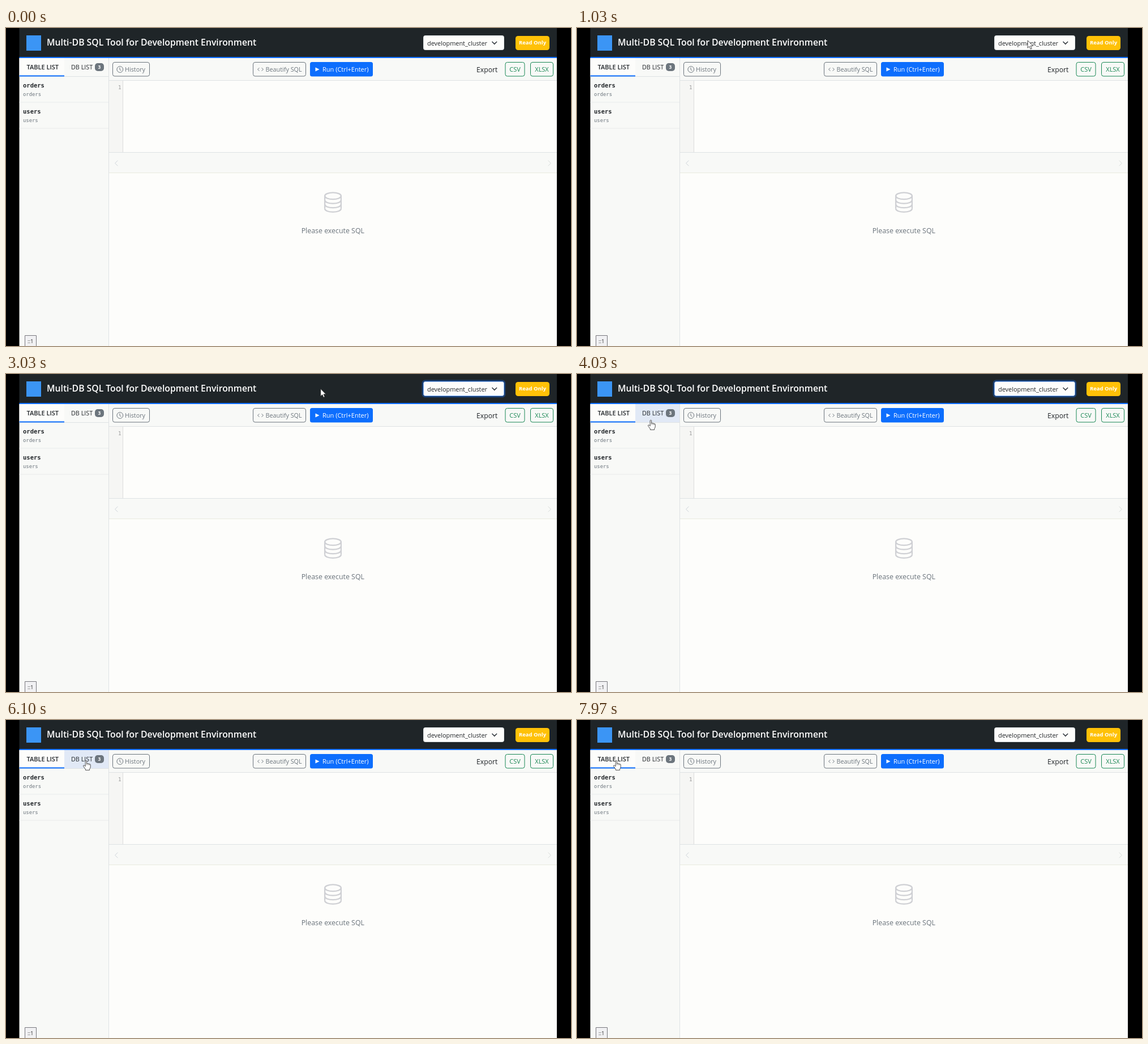
These frames come from a looping animation (998x561 px, 8 s). An HTML page with a canvas:

```html
<!DOCTYPE html>
<html lang="en">
<head>
<meta charset="utf-8">
<title>Multi-DB SQL Tool</title>
<style>
  html, body { margin: 0; width: 100%; height: 100%; overflow: hidden; background: #000; }
  canvas { display: block; width: 100%; height: 100%; }
</style>
</head>
<body>
<canvas id="stage" width="998" height="561"></canvas>
<script>
const ctx = document.getElementById('stage').getContext('2d');
const LOOP = 8000;
const SANS = '"Open Sans", "Noto Sans", sans-serif';
const MONO = '"DejaVu Sans Mono", monospace';
const INK = '#212529', GRAY = '#6c757d', BLUE = '#0d6efd', GREEN = '#198754';
const BAR = '#1f2528', PAPER = '#fdfdfb', PANEL = '#f8f9f7', LINE = '#dee2e4';

const FOCUS_AT = 1300, BLUR_AT = 5170;
const DB_TAB_AT = 6250, TABLE_TAB_AT = 7720;

// Pointer stops: time, x, y, easing of the way there
const stops = [
  [100, 690, 561, 'both'],
  [870, 796, 22, 'both'],
  [2630, 796, 22, 'both'],
  [3030, 557, 26, 'in'],
  [3730, 130, 81, 'out'],
  [4300, 130, 81, 'both'],
  [5000, 136, 69, 'both'],
  [5170, 136, 69, 'both'],
  [5900, 141, 71, 'both'],
  [6900, 141, 71, 'both'],
  [7200, 98, 71, 'in'],
  [7600, 69, 71, 'out']
];

const ease = {
  in: p => p * p,
  out: p => 1 - (1 - p) * (1 - p),
  both: p => p * p * (3 - 2 * p)
};

function pointerAt(t) {
  if (t < stops[0][0]) return null;
  for (let i = 1; i < stops.length; i++) {
    const [t0, x0, y0] = stops[i - 1];
    const [t1, x1, y1, mode] = stops[i];
    if (t < t1) {
      const p = ease[mode]((t - t0) / (t1 - t0));
      return { x: x0 + (x1 - x0) * p, y: y0 + (y1 - y0) * p };
    }
  }
  const [, x, y] = stops[stops.length - 1];
  return { x, y };
}

function rect(x, y, w, h, color) {
  ctx.fillStyle = color;
  ctx.fillRect(x, y, w, h);
}

function box(x, y, w, h, r, fill, stroke, width = 1) {
  ctx.beginPath();
  ctx.roundRect(x, y, w, h, r);
  if (fill) { ctx.fillStyle = fill; ctx.fill(); }
  if (stroke) { ctx.strokeStyle = stroke; ctx.lineWidth = width; ctx.stroke(); }
}

function text(str, x, y, size, color, weight = 400, family = SANS, align = 'left') {
  ctx.font = `${weight} ${size}px ${family}`;
  ctx.textAlign = align;
  ctx.fillStyle = color;
  ctx.fillText(str, x, y);
}

function line(points, color, width = 1) {
  ctx.beginPath();
  points.forEach(([x, y]) => ctx.lineTo(x, y));
  ctx.strokeStyle = color;
  ctx.lineWidth = width;
  ctx.stroke();
}

// Horizontal chevron; dir -1 points left, 1 points right
function chevron(x, y, w, h, dir, color, width) {
  line([[x - dir * w, y - h], [x + dir * w, y], [x - dir * w, y + h]], color, width);
}

function triangle(x1, y1, x2, y2, x3, y3, color) {
  ctx.beginPath();
  ctx.moveTo(x1, y1);
  ctx.lineTo(x2, y2);
  ctx.lineTo(x3, y3);
  ctx.fillStyle = color;
  ctx.fill();
}

function header(focused) {
  rect(23, 0, 950, 51, BAR);
  rect(23, 51, 950, 2, BLUE);
  box(36, 13, 26, 27, 0, '#3b95f5');
  text('Multi-DB SQL Tool for Development Environment', 72, 30.5, 15.75, '#fff', 600);
  if (focused) box(735.8, 11.8, 145.4, 28.4, 4.5, null, 'rgba(13,110,253,.35)', 2.4);
  box(737.5, 13.5, 142, 25, 3, PAPER, focused ? '#86b7fe' : LINE);
  text('development_cluster', 744, 30.5, 10.9, INK);
  line([[858.5, 24], [862.8, 28.3], [867.1, 24]], '#343a40', 1.6);
  box(900, 14, 60, 25, 4.5, '#ffc107');
  text('Read Only', 930, 29, 9.5, '#fff', 700, SANS, 'center');
}

function tab(label, x, w, textX, active, hover) {
  rect(x, 53, w, 32, active ? PAPER : hover ? '#e1e9f6' : PANEL);
  text(label, textX, 73, active ? 11 : 10.8, INK, active ? 600 : 400);
  if (active) rect(x, 83.5, w, 2, BLUE);
}

function tableList() {
  ['orders', 'users'].forEach((name, i) => {
    const y = 46 * i;
    text(name, 30, 104.5 + y, 10.5, INK, 700, MONO);
    text(name, 30, 120 + y, 8.9, GRAY, 400, MONO);
    rect(23, 130.5 + y, 158, 1, '#e9ecec');
  });
}

function dbList() {
  rect(24, 86, 144, 467, PAPER);
  rect(168, 86, 13, 467, '#f6f7f6');
  rect(23, 553, 158, 1, LINE);
  rect(31, 90, 126, 48.5, '#cbcbcb');
  for (let i = 0; i < 3; i++) text('shard' + (i + 1), 32, 102 + 16.4 * i, 10.6, INK);
  triangle(169.5, 96.5, 173.5, 90.5, 177.5, 96.5, '#808080');
  triangle(169.5, 545, 173.5, 551, 177.5, 545, '#808080');
}

function sidebar(dbActive, hover) {
  rect(23, 53, 158, 508, PANEL);
  (dbActive ? dbList : tableList)();
  rect(23, 85, 158, 1, LINE);
  tab('TABLE LIST', 23, 80, 36.5, !dbActive, hover === 'table');
  tab('DB LIST', 103, 78, 115, dbActive, hover === 'db');
  const shift = dbActive ? 1 : 0;
  box(157 + shift, 62, 16, 14, 5, GRAY);
  text('3', 165 + shift, 72.2, 8.4, '#fff', 700, SANS, 'center');
  rect(181, 53, 1, 508, LINE);
  box(33.5, 542.5, 20, 22, 0, '#f1f1f3', '#77777d');
  text('::1', 38, 555.5, 9.6, '#333');
}

function outlineButton(x, w, color) {
  box(x + .5, 60.5, w - 1, 24.5, 3.5, null, color);
}

function toolbar() {
  rect(182, 53, 791, 39, PANEL);
  rect(182, 92, 791, 1, LINE);

  outlineButton(188, 66, GRAY);
  ctx.beginPath();
  ctx.arc(201.3, 73, 5.4, 0, 7);
  ctx.strokeStyle = GRAY;
  ctx.lineWidth = 1;
  ctx.stroke();
  line([[201, 69.5], [201, 73.5], [203.5, 75]], GRAY);
  text('History', 210, 77, 10.8, GRAY);

  outlineButton(436, 94, GRAY);
  chevron(446, 73, 1.4, 2.8, -1, GRAY, 1);
  chevron(453, 73, 1.4, 2.8, 1, GRAY, 1);
  text('Beautify SQL', 458.5, 77, 10.8, GRAY);

  box(537, 60, 111, 25.5, 3.5, BLUE);
  triangle(546.5, 69.5, 553.5, 73, 546.5, 76.5, '#fff');
  text('Run (Ctrl+Enter)', 559, 77, 11, '#fff');

  text('Export', 831, 78, 12.2, INK);
  outlineButton(881.5, 35, GREEN);
  text('CSV', 899, 77, 11, GREEN, 400, SANS, 'center');
  outlineButton(926, 41, GREEN);
  text('XLSX', 946.5, 77, 11, GREEN, 400, SANS, 'center');
}

function editor() {
  rect(182, 93, 791, 126, PAPER);
  rect(182, 93, 24, 126, '#f6f6f4');
  rect(206, 93, 1, 126, '#ddd');
  text('1', 203.5, 108, 9.2, '#999', 400, MONO, 'right');
  rect(182, 219, 791, 1, LINE);
}

function results() {
  rect(182, 220, 791, 35, PANEL);
  rect(182, 255, 791, 1, '#e8ebdf');
  chevron(195, 238.5, 2.4, 4.8, -1, '#ced4da', 1);
  chevron(960, 238.5, 2.4, 4.8, 1, '#d9dedb', 1);
  rect(182, 256, 791, 305, PAPER);

  // Database cylinder
  const cx = 577.5, top = 296.3, rx = 14.4, ry = 5.9, step = 7.5;
  ctx.strokeStyle = '#cfd0d4';
  ctx.lineWidth = 2.3;
  ctx.beginPath();
  ctx.ellipse(cx, top, rx, ry, 0, 0, Math.PI * 2);
  ctx.stroke();
  for (let i = 1; i <= 3; i++) {
    ctx.beginPath();
    ctx.ellipse(cx, top + step * i, rx, ry, 0, 0, Math.PI);
    ctx.stroke();
  }
  for (const side of [-rx, rx]) {
    line([[cx + side, top], [cx + side, top + step * 3]], '#cfd0d4', 2.3);
  }
  text('Please execute SQL', 577.3, 362, 12.4, GRAY, 400, SANS, 'center');
}

const arrowShape = new Path2D('M0 0V13.2L3 10.4L5.1 15.2L7.3 14.2L5.2 9.6H9.4Z');
const handShape = new Path2D(
  'M-.8 1Q.4-.6 1.6 1V6Q3 4.9 4 6.3Q5.3 5.4 6.2 6.8Q7.8 6.2 8.2 8V12' +
  'Q8 14 6.6 15.5V17.4H-.6V15.8L-4.4 10.6Q-4.8 8.6-2.8 9L-.8 10.8Z');
const fingers = new Path2D('M1.6 6V8.6M4 6.3V8.8M6.2 6.8V9');

function cursor({ x, y }, hand) {
  ctx.save();
  ctx.translate(x, y);
  ctx.lineJoin = 'round';
  ctx.lineWidth = .8;
  ctx.strokeStyle = '#222';
  ctx.fillStyle = '#fff';
  const shape = hand ? handShape : arrowShape;
  ctx.fill(shape);
  ctx.stroke(shape);
  if (hand) {
    ctx.lineWidth = .5;
    ctx.stroke(fingers);
  }
  ctx.restore();
}

function hoveredTab(p) {
  if (!p || p.y < 53 || p.y > 85 || p.x < 23 || p.x > 181) return null;
  return p.x < 103 ? 'table' : 'db';
}

function draw(t) {
  const pointer = pointerAt(t);
  const hover = hoveredTab(pointer);
  const dbActive = t >= DB_TAB_AT && t < TABLE_TAB_AT;
  rect(0, 0, 998, 561, '#000');
  ctx.save();
  ctx.beginPath();
  ctx.rect(23.5, 0, 949.5, 561);
  ctx.clip();
  // The hover tint on the first tab lags a moment behind the pointer
  sidebar(dbActive, hover === 'table' && t < 7240 ? null : hover);
  toolbar();
  editor();
  results();
  header(t >= FOCUS_AT && t < BLUR_AT);
  if (pointer) cursor(pointer, hover);
  ctx.restore();
}

const start = performance.now();
function tick() {
  draw((performance.now() - start) % LOOP);
  requestAnimationFrame(tick);
}
tick();
</script>
</body>
</html>
```
